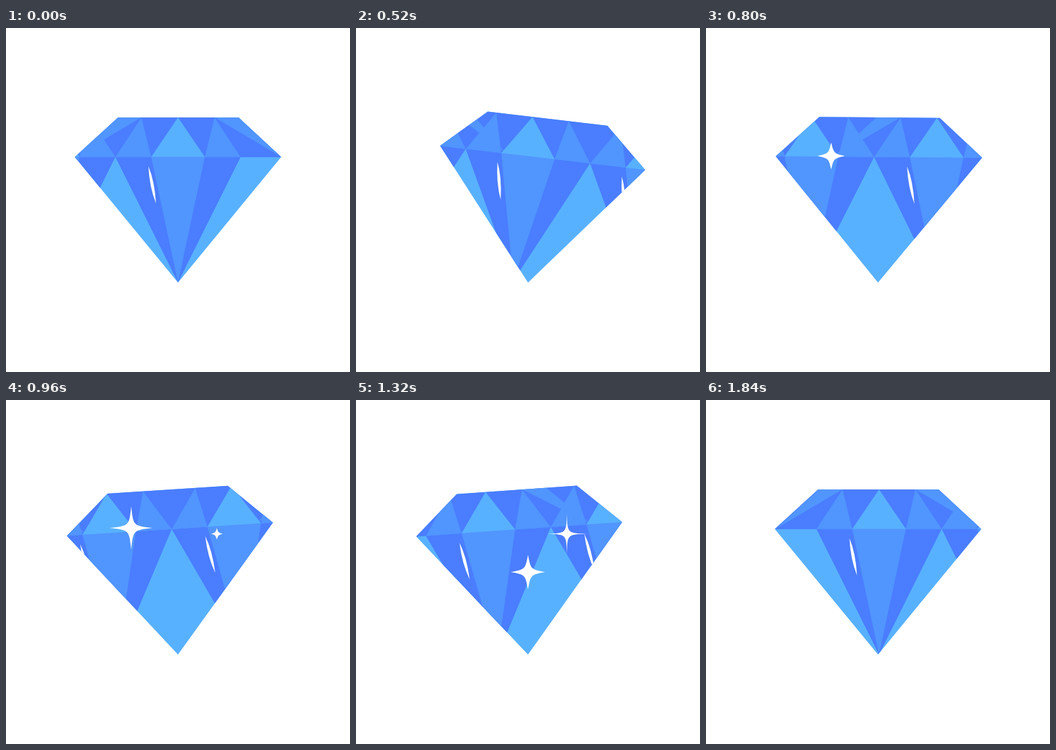
An HTML page with a canvas for the animation above (2.08 s loop, 500 by 500 pixels).

```html
<!DOCTYPE html>
<html lang="en">
<head>
<meta charset="utf-8">
<title>Turning diamond</title>
<style>
  html, body { margin: 0; width: 100%; height: 100%; overflow: hidden; background: #fff; }
  canvas { display: block; width: 500px; height: 500px; }
</style>
</head>
<body>
<canvas id="stage" width="500" height="500"></canvas>
<script>
const ctx = document.getElementById('stage').getContext('2d');

const LOOP = 2080, STEP = 40;
const DARK = '#4a7dff', MID = '#5195ff', LIGHT = '#58b1ff';
const TOP = 130, GIRDLE = 187.5, TIP = 370, CX = 250;
const PITCH = 182, TILES = 7;

// Facet strip: time and distance travelled
const TIMES = [0, 320, 520, 800, 1160, 1520, 1833];
const TRAVEL = [0, 122, 342.5, 630, 1001, 1077.5, 1093.5];
const RATES = TIMES.slice(1).map((t, i) => (TRAVEL[i + 1] - TRAVEL[i]) / (t - TIMES[i]));
const SLOPES = TIMES.map((t, i) => {
  const a = RATES[i - 1], b = RATES[i];
  return a && b ? 2 * a * b / (a + b) : 0;
});

// Sway: linear between these angles
const SWAY_END = 1633, SWAY = [0, 7, -7, 0];

const SPARK_LIFE = 640, SPARK_SIZE = 32;
const SPARKS = [
  { x: 182, y: 186, start: 640 },
  { x: 306.5, y: 194.5, start: 890 },
  { x: 250, y: 250, start: 1110 }
];

// Smooth monotone curve through the travel points
function travel(t) {
  const last = TIMES.length - 1;
  if (t >= TIMES[last]) return TRAVEL[last];
  let i = 0;
  while (t >= TIMES[i + 1]) i++;
  const h = TIMES[i + 1] - TIMES[i], u = (t - TIMES[i]) / h, v = 1 - u;
  return TRAVEL[i] * (1 + 2 * u) * v * v + SLOPES[i] * h * u * v * v
    + TRAVEL[i + 1] * (3 - 2 * u) * u * u - SLOPES[i + 1] * h * u * u * v;
}

function sway(t) {
  if (t >= SWAY_END) return 0;
  const p = t / SWAY_END * 3, i = Math.floor(p);
  return (SWAY[i] + (SWAY[i + 1] - SWAY[i]) * (p - i)) * Math.PI / 180;
}

function trace(points) {
  ctx.beginPath();
  points.forEach(([x, y]) => ctx.lineTo(x, y));
  ctx.closePath();
}

function fill(color, ...points) {
  trace(points);
  ctx.fillStyle = color;
  ctx.fill();
}

function eachTile(shift, draw) {
  for (let k = 0; k < TILES; k++) {
    const x = CX + shift - k * PITCH;
    if (x > -60 && x < 560) draw(x, k);
  }
}

function pavilion(x) {
  fill(DARK, [x - 91, GIRDLE], [x + 91, GIRDLE], [x, TIP]);
  fill(MID, [x - 39, GIRDLE], [x + 39, GIRDLE], [x, TIP]);
}

function shoulders(x) {
  for (const s of [-1, 1]) {
    fill(MID, [x + s * 53, TOP], [x + s * 88, TOP], [x + s * 150, GIRDLE]);
    fill(DARK, [x + s * 53, TOP], [x + s * 150, GIRDLE], [x + s * 91, GIRDLE]);
  }
}

function crown(x) {
  for (const s of [-1, 1]) {
    fill(MID, [x + s * 53, TOP], [x + s * 39, GIRDLE], [x + s * 91, GIRDLE]);
  }
  fill(LIGHT, [x, TOP], [x - 39, GIRDLE], [x + 39, GIRDLE]);
}

function glint(x) {
  ctx.beginPath();
  ctx.moveTo(x - 43, 201);
  ctx.quadraticCurveTo(x - 41.5, 231, x - 32, 255);
  ctx.quadraticCurveTo(x - 34, 222, x - 43, 201);
  ctx.fillStyle = '#fff';
  ctx.fill();
}

function diamond(t) {
  const shift = travel(t);
  ctx.save();
  ctx.translate(CX, TIP);
  ctx.rotate(sway(t));
  ctx.translate(-CX, -TIP);
  trace([[163, TOP], [338, TOP], [400, GIRDLE], [CX, TIP], [100, GIRDLE]]);
  ctx.clip();
  ctx.fillStyle = LIGHT;
  ctx.fillRect(90, TOP - 2, 320, 250);
  ctx.fillStyle = DARK;
  ctx.fillRect(90, TOP - 2, 320, GIRDLE - TOP + 2);
  eachTile(shift, pavilion);
  eachTile(shift, (x, k) => { if (k % 3 === 0) shoulders(x); });
  eachTile(shift, crown);
  eachTile(shift, glint);
  ctx.restore();
}

// Four-pointed star that swells, then thins out as it fades
function spark({ x, y, start }, t) {
  const u = (t - start) / SPARK_LIFE;
  if (u <= 0 || u >= 1) return;
  const r = SPARK_SIZE * Math.sin(Math.PI * Math.pow(u, 1.12));
  const q = r * ((0.34 - 0.29 * u) - 0.125) / 0.75;
  ctx.save();
  ctx.translate(x, y);
  ctx.beginPath();
  ctx.moveTo(r, 0);
  let px = 1, py = 0;
  for (let i = 0; i < 4; i++) {
    const nx = -py, ny = px;
    const cx = (px + nx) * q, cy = (py + ny) * q;
    ctx.bezierCurveTo(cx, cy, cx, cy, nx * r, ny * r);
    px = nx;
    py = ny;
  }
  ctx.fillStyle = '#fff';
  ctx.fill();
  ctx.restore();
}

function render(t) {
  ctx.fillStyle = '#fff';
  ctx.fillRect(0, 0, 500, 500);
  diamond(t);
  SPARKS.forEach(s => spark(s, t));
}

const began = performance.now();
function tick() {
  const t = Math.max(0, performance.now() - began) % LOOP;
  render(Math.floor(t / STEP) * STEP);
  requestAnimationFrame(tick);
}
tick();
</script>
</body>
</html>
```
